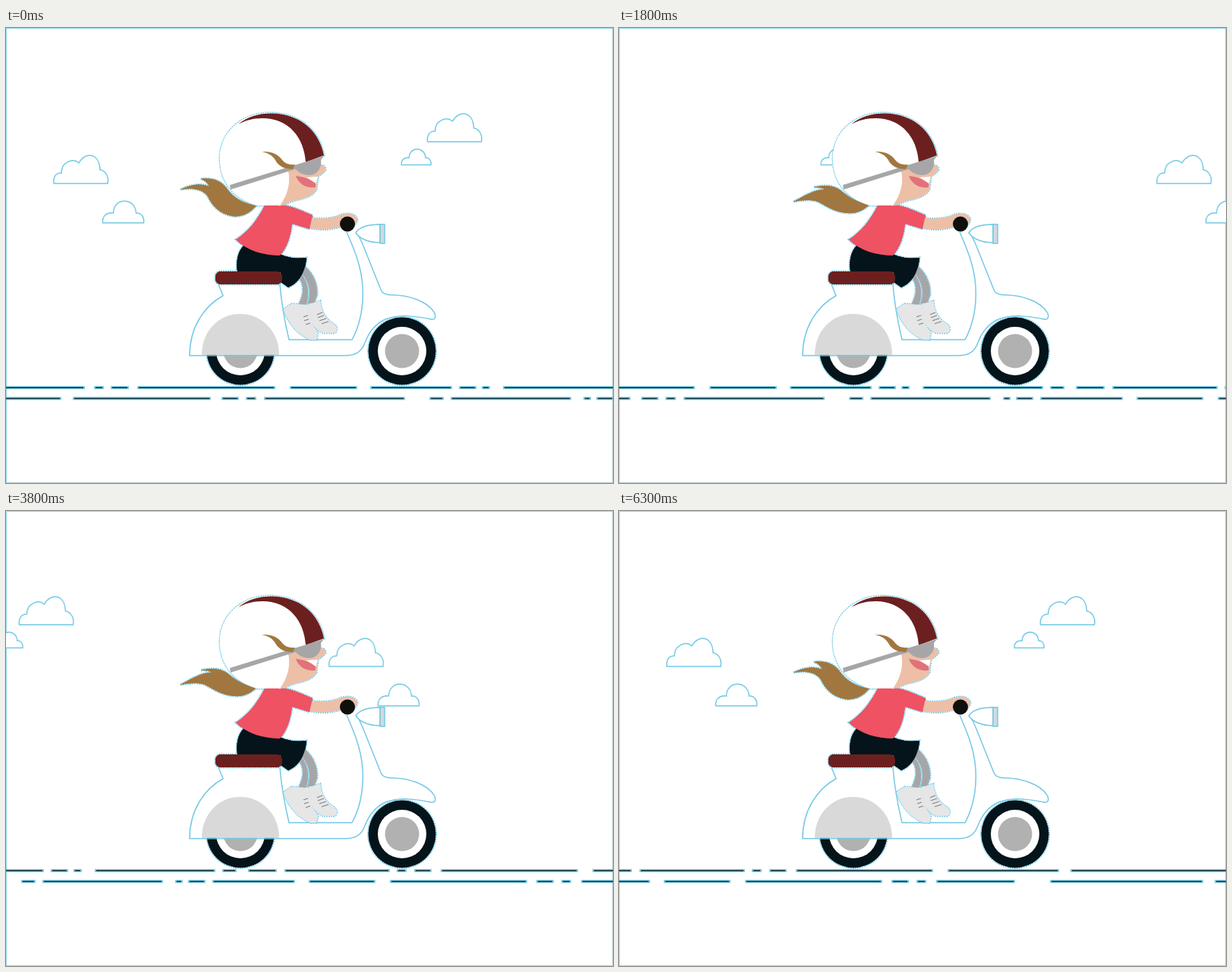
Recreate the animation shown at these times as an HTML page without scripts. Size 800 by 600 pixels, loop 6400 ms.

```html
<!DOCTYPE html>
<html lang="en">
<head>
<meta charset="utf-8">
<title>Scooter ride</title>
<style>
  html, body { margin: 0; width: 100%; height: 100%; overflow: hidden; background: #fff; }
  svg { display: block; width: 800px; height: 600px; }

  .line { fill: none; stroke: #74c9e5; stroke-width: 1.5; }
  .white { fill: #fff; stroke: #74c9e5; stroke-width: 1.5; }
  .edge { stroke: #7fcfe9; stroke-width: 3; stroke-dasharray: 2 1; paint-order: stroke; }
  .ink { fill: #04141a; }
  .maroon { fill: #6b201f; }
  .skin { fill: #edbfa7; }
  .hair { fill: #a1773f; }
  .shirt { fill: #ee5263; }
  .grey { fill: #a6a6a8; }
  .hub { fill: #b1b1b1; }
  .shoe { fill: #e6e6e7; }
  .lace { fill: none; stroke: #858588; stroke-width: 1.3; }

  .glow { stroke: #74cae5; stroke-width: 4; stroke-linecap: square; }
  .tar { stroke: #0b2a35; stroke-width: 1.5; }

  .sky { animation: sky 6.4s infinite; }
  .road { animation: road 6.4s infinite; }
  .tail { animation: .4s step-end infinite; }
  .up { animation-name: up; }
  .mid { animation-name: mid; }
  .low { animation-name: low; }

  /* 64 steps of 100 ms; the drift ends before the last step */
  @keyframes sky {
    0% { transform: translateX(0); animation-timing-function: steps(62); }
    96.875% { transform: translateX(-878px); animation-timing-function: step-end; }
    98.4375%, 100% { transform: translateX(-901px); }
  }
  @keyframes road {
    0% { transform: translateX(0); animation-timing-function: steps(62); }
    96.875%, 100% { transform: translateX(-878px); }
  }
  @keyframes up { 0% { visibility: visible; } 25%, 100% { visibility: hidden; } }
  @keyframes mid { 0%, 50% { visibility: hidden; } 25%, 75%, 100% { visibility: visible; } }
  @keyframes low { 0%, 75%, 100% { visibility: hidden; } 50% { visibility: visible; } }
</style>
</head>
<body>
<svg viewBox="0 0 800 600">
  <defs>
    <path id="big" d="M1 0C0 -9 4 -14 11 -14C11 -28 26 -34 34 -27C42 -42 61 -41 62 -18C69 -17 74 -9 72 0Z"/>
    <path id="small" d="M1 0C0 -9 6 -14 15 -13C15 -34 44 -34 45 -13C52 -14 56 -7 55 0Z"/>
    <g id="clouds" class="white">
      <use href="#big" x="62" y="205"/>
      <use href="#small" x="126.500" y="257"/>
      <use href="#big" x="554.500" y="150"/>
      <use href="#small" transform="translate(520.500 180.500) scale(.72)" style="stroke-width:2"/>
    </g>
    <g id="lanes" fill="none">
      <path d="M-2 474.300H1690" stroke-dasharray="104 16 9 13 20 15 178 23 85 21 104 13 19 11 7 21 155 13 15 19 34 14 135 13 9 14 19 16 177 23 143 19 217"/>
      <path d="M-2 488.500H1690" stroke-dasharray="73 19 178 18 19 13 10 14 182 36 15 13 155 20 6 11 19 13 105 22 84 23 177 16 19 14 9 17 100 50 198 19 27"/>
    </g>
    <g id="wheel">
      <circle class="ink edge" r="44.500"/>
      <circle r="32" fill="#fff"/>
      <circle class="hub" r="22.500"/>
    </g>
    <clipPath id="belowFender"><path d="M240 431H380V480H240Z"/></clipPath>

    <!-- silhouettes, drawn once as a dotted outline and once filled -->
    <g id="rider">
      <g class="grey">
        <path d="M393 314C404 322 411 337 410 352L406 363H398C402 350 402 338 389 322Z"/>
        <path d="M386 329C394 340 392 352 386 364L395 366C400 352 399 338 390 325Z"/>
      </g>
      <g class="shoe">
        <path d="M366 371L376 364L399 365L402 388L411 402L409 411H402C386 405 372 390 366 371Z"/>
        <path d="M399 364L414 360C415 373 421 384 431 390C437 393 437 399 433 402H418C410 398 406 393 402 388Z"/>
      </g>
      <path class="ink" d="M313 287C328 296 345 299 361 298C373 304 385 304 396 303C395 320 387 336 372 342L362 335V322H305C303 308 305 296 313 287Z"/>
      <rect class="maroon" x="276" y="321" width="88" height="17" rx="7"/>
      <path class="skin" d="M400 250C415 253 428 251 438 248C448 243 462 244 463 254L458 262H441C428 266 414 267 398 263Z"/>
      <path class="shirt" d="M341 234H368C380 236 392 242 404 247L400 265L377 258C375 276 370 290 361 300C340 300 318 294 303 279C320 268 332 252 341 234Z"/>
      <g class="hair">
        <path class="tail up" d="M230 213C242 207 256 204 268 209C266 204 262 201 257 199C275 197 285 203 292 213C300 224 314 232 330 234C322 244 310 250 298 248C282 245 272 235 266 222C258 211 244 211 230 213Z"/>
        <path class="tail mid" d="M230 229C244 222 256 213 271 213C267 210 262 210 257 210C272 206 284 208 292 214C302 223 314 230 330 233C322 241 312 245 301 244C284 243 272 234 262 229C252 226 242 227 230 229Z"/>
        <path class="tail low" d="M241 237C243 226 250 214 267 213C262 211 258 212 254 213C266 208 282 207 291 214C302 225 316 230 330 233C320 243 306 245 296 243C280 240 274 226 262 226C252 226 247 231 241 237Z"/>
      </g>
      <path class="skin" d="M370 185L414 182C418 180 421 183 421 187C419 191 414 193 411 196L409 213C404 222 392 225 382 227C374 229 368 233 360 235Z"/>
      <path fill="#fff" d="M330 234C300 224 282 203 282 172C282 138 310 112 348 112C388 112 414 137 419 168L372 188C376 205 370 222 361 234Z"/>
    </g>
  </defs>

  <path d="M0 599.500H799.500V0" fill="none" stroke="#b9c8ce"/>
  <path d="M.5 600V.5H800" fill="none" stroke="#8ed8ee"/>

  <g class="sky">
    <use href="#clouds"/>
    <use href="#clouds" x="901"/>
  </g>
  <g class="road">
    <use href="#lanes" class="glow"/>
    <use href="#lanes" class="tar"/>
  </g>

  <!-- scooter -->
  <g clip-path="url(#belowFender)"><use href="#wheel" x="309" y="426"/></g>
  <path class="line" d="M280 338L286 353C262 366 242 394 242 432H446C460 432 468 428 473 415C478 402 485 391 500 384C520 377 540 380 560 384C565 385 567 382 565 376C556 360 530 352 508 352C500 352 496 350 494 345L470 285L462 268"/>
  <path class="line" d="M449 269C458 290 468 312 470 340C472 370 465 395 456 411H373C368 390 363 364 361 338"/>
  <path d="M258 431C258 400 280 377 308.500 377C337 377 360 400 360 431Z" fill="#d9d9d9"/>
  <use href="#wheel" x="522" y="426"/>
  <path class="white" d="M461 270C466 262 478 259 493 259V283C478 283 466 278 461 270Z"/>
  <path class="line" d="M493 259H499V284H493Z" style="fill:#d3d9db"/>

  <use href="#rider" class="edge"/>
  <use href="#rider"/>

  <!-- details -->
  <path class="lace" d="M410 378L417 375M411 382L419 379M413 386L422 383M416 390L425 387M392 381L398 379M393 386L399 384M395 391L401 389"/>
  <circle cx="450" cy="258.500" r="10" fill="#0f0f0c"/>
  <path class="skin" d="M372 186L396 180L404 194L382 196C388 206 396 211 405 211L398 222C386 226 374 227 363 234C371 222 376 206 372 186Z"/>
  <path d="M382 195C390 196 400 198 408 205V210C396 212 386 206 382 195Z" fill="#e2717a"/>
  <path d="M396 197L411 196L408.500 205C404 202 400 199 396 197Z" fill="#fff"/>
  <path class="maroon" d="M306 127C318 117 333 112.500 350 112.500C388 113 413 136 419 168L395 177C393 146 374 119 338 119C325 119 315 122 306 127Z"/>
  <path class="grey" d="M295 207L380 181L419 169L415 174C417 186 408 195 398 194C390 193 385 190 382 186L296 213Z"/>
  <path class="hair" d="M337 163C352 162 360 168 364 174C368 179 374 181 381 180L378 186C366 186 360 182 356 176C352 168 346 165 337 163Z"/>
</svg>
</body>
</html>
```
